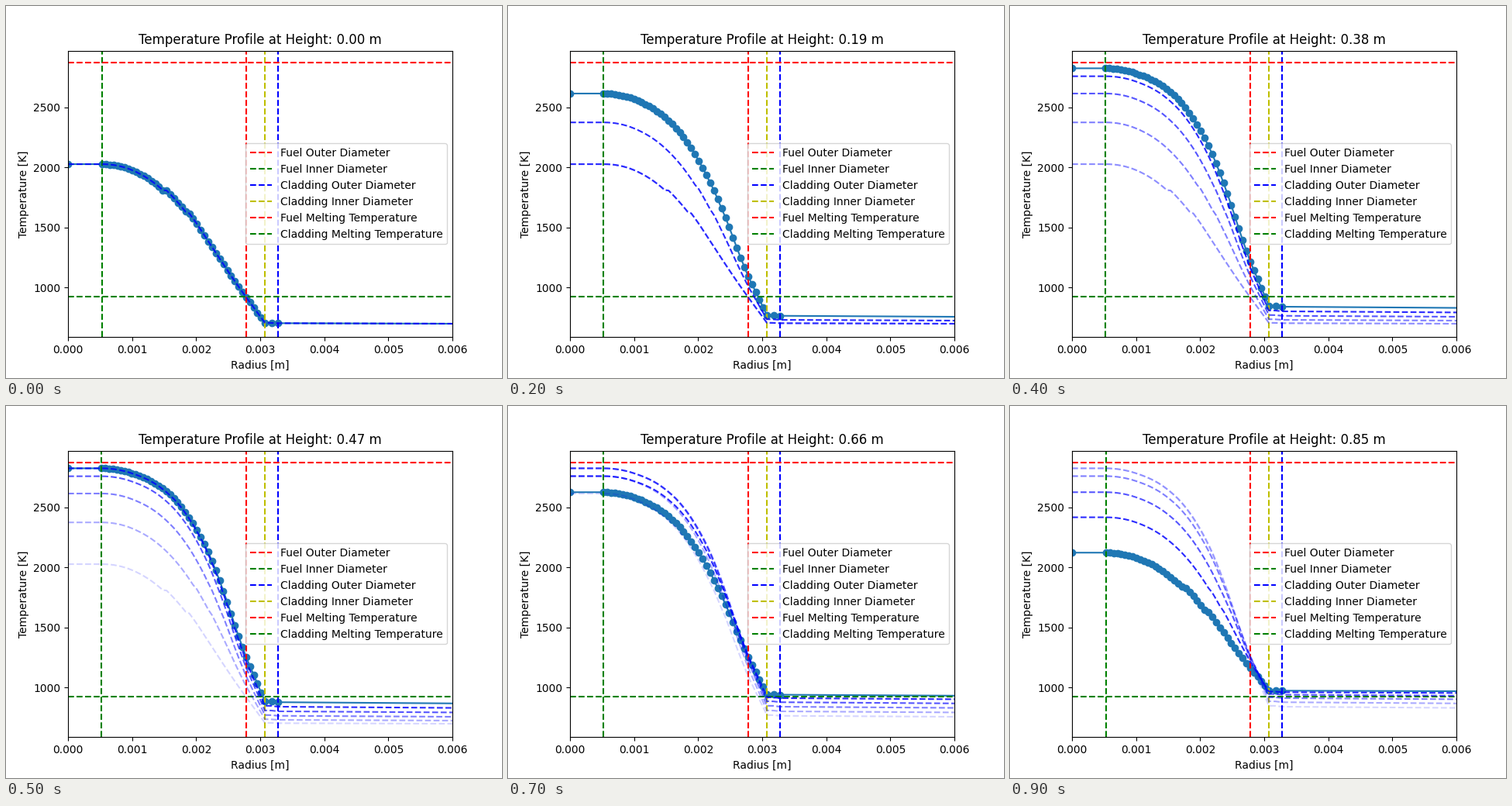
Write a matplotlib script that moves like this. It is 640x480 px and loops after 1000 ms.

```python
import numpy as np
import matplotlib.pyplot as plt
from matplotlib.animation import FuncAnimation

FRAMES = 10
TRAIL = 5
FUEL_OUT, CLAD_IN, CLAD_OUT, X_MAX = 0.002782, 0.003073, 0.003278, 0.006
COLD, HOT = 2028, 2822  # range of centre temperatures [K]
ZONE_LIMITS = (1810, 1625)  # fuel restructuring temperatures [K]

# Relative temperature drop across the fuel for a cold and a hot pellet
NODES = np.array([0, 8, 16, 20, 24, 28, 32, 36, 38])
COLD_DROP = np.array([0, .044, .186, .298, .435, .598, .764, .924, 1])
HOT_DROP = np.array([0, .026, .107, .181, .292, .444, .650, .889, 1])


def smooth(x, xp, yp):
    """Cubic Hermite interpolation with a flat start."""
    slope = np.gradient(yp, xp)
    slope[0] = 0
    k = np.clip(np.searchsorted(xp, x, side="right") - 1, 0, len(xp) - 2)
    h = xp[k + 1] - xp[k]
    t = (x - xp[k]) / h
    return ((1 + 2 * t) * (1 - t) ** 2 * yp[k] + t * (1 - t) ** 2 * h * slope[k]
            + t * t * (3 - 2 * t) * yp[k + 1] + t * t * (t - 1) * h * slope[k + 1])


def profile(i):
    """Radii and temperatures at height step i, for a cosine-shaped power."""
    phase = 0.25 * (i - (FRAMES - 1) / 2)
    power, rise = np.cos(phase), np.sin(phase)
    clad = 823 + 45 * power + 150 * rise
    surface = clad + 70 + 300 * power - 14 * rise
    centre = 1264 + 2120 * power - 550 * power ** 2 + 80 * rise ** 5

    heat = (centre - COLD) / (HOT - COLD)
    step = 26 * max(0, 1 - heat)
    drop = smooth(np.arange(39), NODES, COLD_DROP + heat * (HOT_DROP - COLD_DROP))
    fuel = centre - drop * (centre - surface + len(ZONE_LIMITS) * step)
    for limit in ZONE_LIMITS:
        fuel[np.argmax(fuel < limit):] += step

    inner_radius = 0.000532 - 1e-5 * heat
    radius = np.concatenate([
        [0], np.linspace(inner_radius, FUEL_OUT, 39),
        np.linspace(FUEL_OUT, CLAD_IN, 6)[1:],
        np.linspace(CLAD_IN, CLAD_OUT, 3)[1:], [X_MAX]])
    temp = np.concatenate([
        [centre], fuel, np.linspace(fuel[-1], clad, 6)[1:],
        [clad - 1, clad - 8 * power, clad - 18 * power]])
    return radius, temp


profiles = [profile(i) for i in range(FRAMES)]
heights = np.linspace(0, 0.85, FRAMES)

fig, ax = plt.subplots(figsize=(6.4, 4.8), dpi=100)
current, = ax.plot([], [], marker="o")
ax.axvline(FUEL_OUT, color="r", ls="--", label="Fuel Outer Diameter")
inner = ax.axvline(0, color="g", ls="--", label="Fuel Inner Diameter")
ax.axvline(CLAD_OUT, color="b", ls="--", label="Cladding Outer Diameter")
ax.axvline(CLAD_IN, color="y", ls="--", label="Cladding Inner Diameter")
ax.axhline(2873.15, color="r", ls="--", label="Fuel Melting Temperature")
ax.axhline(923.15, color="g", ls="--", label="Cladding Melting Temperature")
ghosts = [ax.plot([], [], "b--", alpha=1 - (age + 1) / (TRAIL + 1))[0]
          for age in range(TRAIL)]
for age, ghost in enumerate(ghosts):
    ghost.set_zorder(2.5 - 0.01 * age)

ax.set_xlim(0, X_MAX)
ax.set_ylim(588, 2973.15)
ax.set_xlabel("Radius [m]")
ax.set_ylabel("Temperature [K]")
ax.legend(loc="center right")


def update(i):
    radius, temp = profiles[i]
    # Keep the last point out of sight so that it shows no marker
    current.set_data(radius, temp)
    current.set_markevery(slice(0, -1))
    inner.set_xdata([radius[1]] * 2)
    for age, ghost in enumerate(ghosts):
        past = i - 1 - age
        # The first profile enters the trail twice
        ghost.set_data(*profiles[max(past, 0)] if past >= -1 else ([], []))
    ax.set_title(f"Temperature Profile at Height: {heights[i]:.2f} m")
    return [current, inner, *ghosts]


anim = FuncAnimation(fig, update, frames=FRAMES, interval=100, repeat=True,
                     repeat_delay=0)
plt.show()
```
